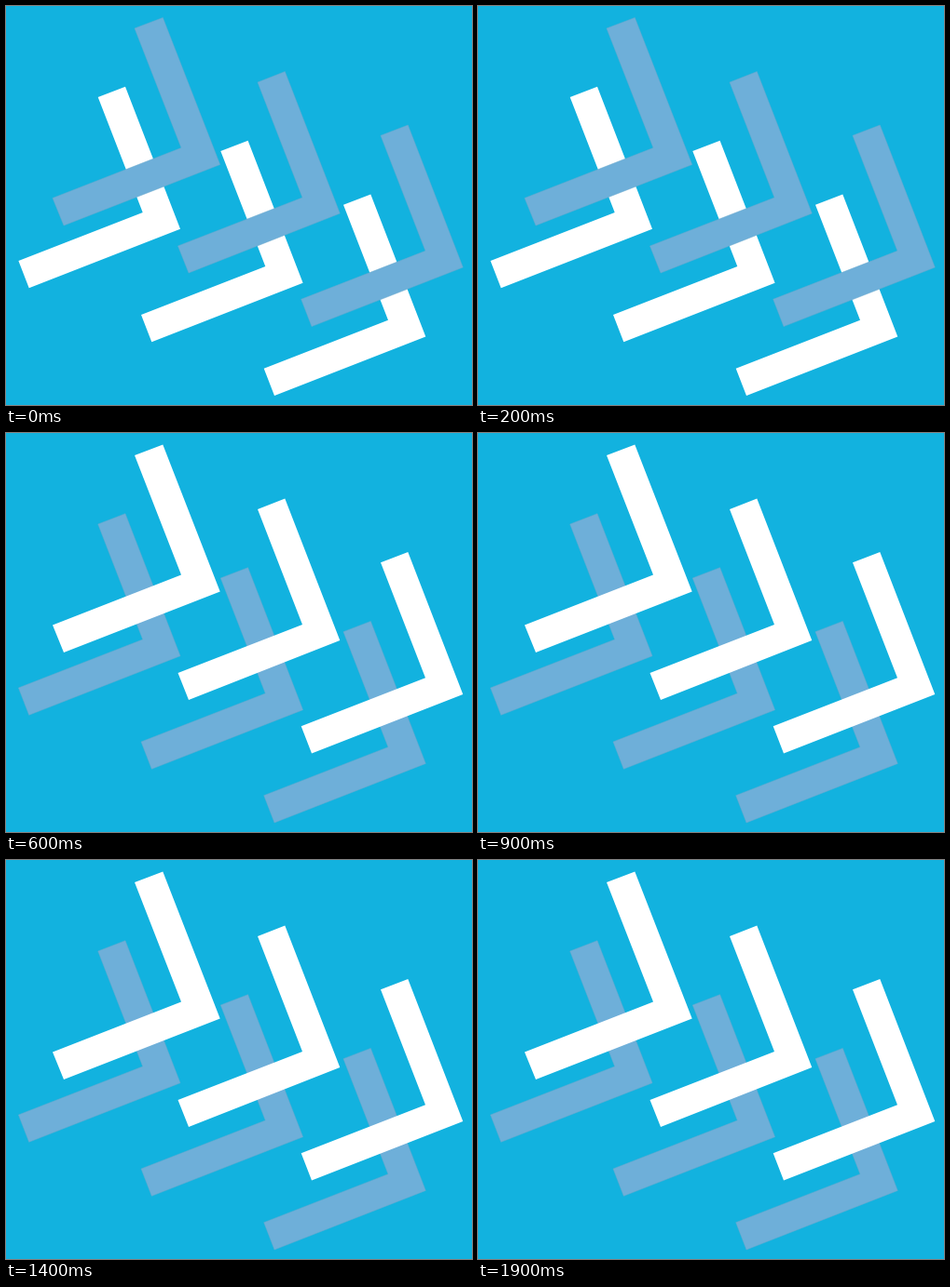
Recreate the animation shown at these times as an HTML page. Size 500 by 429 pixels, loop 2 s.

```html
<!DOCTYPE html>
<html lang="en">
<head>
<meta charset="utf-8">
<title>Blinking chevrons</title>
<style>
  html, body { margin: 0; width: 100%; height: 100%; overflow: hidden; background: #12b2df; }
  svg { display: block; width: 100vw; height: 100vh; }
</style>
</head>
<body>
<svg viewBox="0 0 500 429">
  <defs>
    <path id="chevron" d="M0 0 29.3-11.3 88.3 141.7-74 205.3-85.3 176 48 124Z"/>
  </defs>
  <g id="back">
    <use href="#chevron" x="98.7" y="98"/>
    <use href="#chevron" x="230.3" y="156"/>
    <use href="#chevron" x="362" y="213.7"/>
  </g>
  <g id="front">
    <path d="M138 24 168.300 12.500 229.700 170.500 62 236 50 206.500 188 152.500Z"/>
    <path d="M270 82 299.300 70.500 358.300 223 196 287 184.500 258 318 206Z"/>
    <use href="#chevron" x="402" y="139.3"/>
  </g>
</svg>
<script>
  const LOOP = 2000, BLINK = 1000, SWITCH = 400;
  const WHITE = '#fff', BLUE = '#6eafd9', EDGE = '#69a8cc';
  const back = document.getElementById('back');
  const front = document.getElementById('front');

  function paint(group, lit) {
    group.setAttribute('fill', lit ? WHITE : BLUE);
    group.setAttribute('stroke', lit ? 'none' : EDGE);
    group.setAttribute('stroke-width', 0.5);
  }

  function render(time) {
    const frontLit = (time % LOOP) % BLINK >= SWITCH;
    paint(front, frontLit);
    paint(back, !frontLit);
  }

  const start = performance.now();
  function tick() {
    render(performance.now() - start);
    requestAnimationFrame(tick);
  }
  tick();
</script>
</body>
</html>
```
